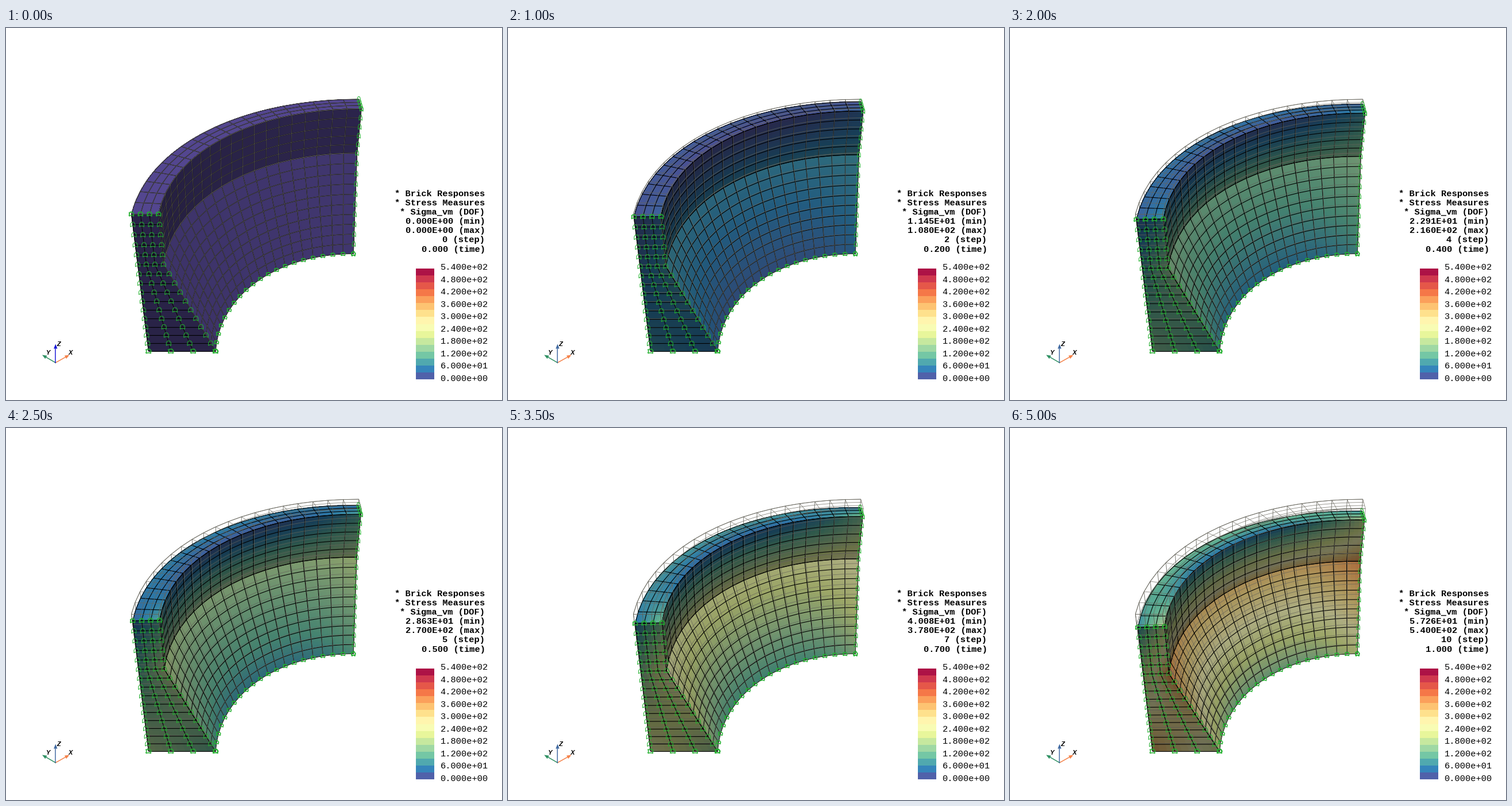
A matplotlib script that plays this animation: 864x648 px, repeating every 5500 ms.

```python
import numpy as np
import matplotlib.pyplot as plt
from matplotlib.animation import FuncAnimation
from matplotlib.collections import LineCollection, PolyCollection

W, H, DPI = 864, 648, 100
STEPS = 10
PX = 72 / DPI  # points per pixel
CMAP = plt.get_cmap("Spectral_r")

# Camera: isometric view, 30 degree lens, unit scale at the focal point
FOCAL = 1209.0
SIN_E, COS_E = np.sqrt(1 / 3), np.sqrt(2 / 3)

# Ring section: outer radius, upper and lower inner radius, height, axis offset
R_OUT, R_TOP, R_BASE = 364.0, 325.9, 254.7
HEIGHT, AXIS = 274.1, 192.0
Z_TOP = AXIS * np.sqrt(0.5)
KINK = 2 / 3

GREEN = "#20b02c"


def project(a, b, z):
    depth = FOCAL + b * COS_E - z * SIN_E
    k = FOCAL / depth
    return np.stack([W / 2 + k * a, H / 2 - k * (z * COS_E + b * SIN_E)], -1)


def place(t, s, w, load):
    """Screen position; t around, s up the section, w from outer to inner."""
    r_in = R_BASE + (R_TOP - R_BASE) * np.minimum(s / KINK, 1)
    bulge = 6.5 * np.sin(np.pi * t) * np.sin(np.pi / 2 * s)
    r = R_OUT + (r_in - R_OUT) * w + load * (bulge - 1.2 * s)
    z = Z_TOP - HEIGHT * (1 - s)
    z = z - load * (23.3 - 1.5 * w) * s * (1.6 - 0.6 * s)
    ang = t * np.pi / 2
    return project(AXIS - r * np.cos(ang), r * np.sin(ang) - AXIS, z)


def stress(t, s, w):
    q = np.abs(2 * t - 1) ** 3.5
    p = np.minimum(s / KINK, 1)
    r = np.maximum(3 * s - 2, 0)
    inner = 0.26 + 0.37 * p ** 0.85 + q * (0.15 - 0.05 * p)
    inner = inner + r ** 0.85 * (0.1 + 0.26 * q - 0.63 - 0.1 * q)
    outer = 0.24 - 0.12 * q + 0.56 * (1 - s) ** 0.8
    return np.clip(outer + (inner - outer) * w, 0.106, 1)


# Visible faces: parameter map, divisions, shade at the near and far end
TOP = (lambda u, v: (u, 1 + 0 * u, v), 20, 3, 0.88, 0.88)
UPPER = (lambda u, v: (u, KINK + v / 3, 1 + 0 * u), 20, 5, 0.38, 0.46)
LOWER = (lambda u, v: (u, v * KINK, 1 + 0 * u), 20, 10, 0.64, 0.68)
END = (lambda u, v: (0 * u, v, u), 3, 15, 0.44, 0.44)
OUTER = (lambda u, v: (u, v, 0 * u), 20, 15, 1, 1)
BODY = (TOP, UPPER, LOWER, END)
SUB = 3


def grid(face, sub=1, centre=False):
    fn, n, m = face[:3]
    n, m = n * sub, m * sub
    u, v = np.arange(n + 1) / n, np.arange(m + 1) / m
    if centre:
        u, v = u[:-1] + 0.5 / n, v[:-1] + 0.5 / m
    return fn(*np.meshgrid(u, v, indexing="ij"))


def quads(face, load):
    p = place(*grid(face, SUB), load)
    cells = [p[:-1, :-1], p[1:, :-1], p[1:, 1:], p[:-1, 1:]]
    return np.stack(cells, -2).reshape(-1, 4, 2)


def mesh_lines(faces, load):
    segs = []
    for face in faces:
        p = place(*grid(face), load)
        segs += list(p) + list(p.transpose(1, 0, 2))
    return segs


def tint(face, load):
    t, s, w = grid(face, SUB, centre=True)
    rgb = CMAP(load * stress(t, s, w))[..., :3]
    near, far = face[3:]
    shade = near + (far - near) * np.sin(t * np.pi / 2)
    return (rgb * shade[..., None]).reshape(-1, 3)


# Support symbols
HOUSE = np.array([(-4, 4), (-4, -1), (-2, -4), (2, -4), (4, -1), (4, 4),
                  (1.6, 2.6), (-1.6, 2.6), (-4, 4)], float)
FLAT = np.array([(-5, -3), (3, -3), (5, 0), (3, 3), (-5, 3), (-3, 0), (-5, -3)], float)
ROWS = np.arange(16) / 15
COLS = np.arange(4) / 3
ARC = np.arange(21) / 20


def symbols(load):
    def at(t, s, w, shape):
        t, s, w = np.broadcast_arrays(t, s, w)
        pts = place(t, s, w, load).reshape(-1, 1, 2)
        return list(pts + shape)

    narrow = HOUSE * (0.65, 1.1)
    segs = at(0.0, ROWS[:, None], COLS[None, :], HOUSE)
    segs += at(0.0, 1.0, COLS, FLAT * (0.9, 0.8))
    segs += at(1.0, ROWS, 1.0, narrow)
    segs += at(1.0, 1.0, COLS, narrow)
    segs += at(ARC, 0.0, 1.0, HOUSE * 0.8)
    segs += at(ARC, 0.0, 1.0, FLAT * 0.8)
    segs += at(0.0, 0.0, COLS, FLAT)
    return segs


fig = plt.figure(figsize=(W / DPI, H / DPI), dpi=DPI, facecolor="white")
ax = fig.add_axes([0, 0, 1, 1])
ax.axis("off")


def label(x, y, text, **kw):
    style = dict(family="Liberation Mono", size=15.4 * PX, color="black")
    return ax.text(x, y, text, **{**style, **kw})


def lines(segs, color, width, z, **kw):
    return ax.add_collection(
        LineCollection(segs, colors=color, linewidths=width * PX, zorder=z, **kw))


# Colour bar
BANDS, BAR_TOP, BAR_END = 16, 419, 612
band = (BAR_END - BAR_TOP) / BANDS
for i in range(BANDS):
    ax.add_patch(plt.Rectangle((714, BAR_TOP + i * band), 32, band + 0.3, lw=0,
                               color=CMAP(1 - (i + 0.5) / BANDS)))
for i in range(10):
    label(756.5, 421 + 21.55 * i, f"{540 - 60 * i:.3e}")

# Axis triad
ORIGIN = np.array([86.3, 583.0])


def arrow(tip, color):
    tip = np.array(tip, float)
    d = (tip - ORIGIN) / np.hypot(*(tip - ORIGIN))
    base, side = tip - 8 * d, 3.2 * np.array([-d[1], d[0]])
    stem, = ax.plot(*zip(ORIGIN, base), color=color, lw=1.5 * PX)
    head = ax.add_patch(plt.Polygon([tip, base + side, base - side], color=color, lw=0))
    return stem, head


arrow((110.5, 569.5), "#f58249")
arrow((63, 569.5), "#2f9163")
z_axis = arrow((86.3, 550.5), "#1a1ad8")
for x, y, name in ((108, 569, "X"), (69, 569, "Y"), (88, 554, "Z")):
    label(x, y, name, family="Liberation Sans", weight="bold", style="italic",
          size=11 * PX)

# Model
lines(mesh_lines([OUTER], 0), "#6c6c64", 0.9, 2)
lines(mesh_lines([END], 0), "#5c5c54", 0.8, 4)
fills = [ax.add_collection(PolyCollection(quads(f, 0), antialiaseds=False,
                                          linewidths=0, zorder=3)) for f in BODY]
edges = lines([], "black", 1.1, 5)
lines(mesh_lines([TOP, UPPER, LOWER], 0), "#66645a", 0.8, 6, alpha=0.8)
marks = lines([], GREEN, 1.0, 7)
info = [label(834.5, 293 + 16.1 * i, "", weight="bold", ha="right") for i in range(7)]

ax.set_xlim(0, W)
ax.set_ylim(H, 0)


def update(step):
    load = step / STEPS
    for face, fill in zip(BODY, fills):
        fill.set_verts(quads(face, load))
        fill.set_facecolor(tint(face, load))
    edges.set_segments(mesh_lines(BODY, load))
    marks.set_segments(symbols(load))
    for part in z_axis:
        part.set_color("#426ba2" if step else "#1a1ad8")
    rows = ("* Brick Responses", "* Stress Measures", "* Sigma_vm (DOF)",
            f"{5.7263 * step:.3E} (min)", f"{54 * step:.3E} (max)",
            f"{step} (step)", f"{load:.3f} (time)")
    for text, row in zip(info, rows):
        text.set_text(row)
    return [*fills, edges, marks, *z_axis, *info]


anim = FuncAnimation(fig, update, frames=STEPS + 1, interval=500,
                     repeat=True, repeat_delay=0, blit=False)
plt.show()
```
